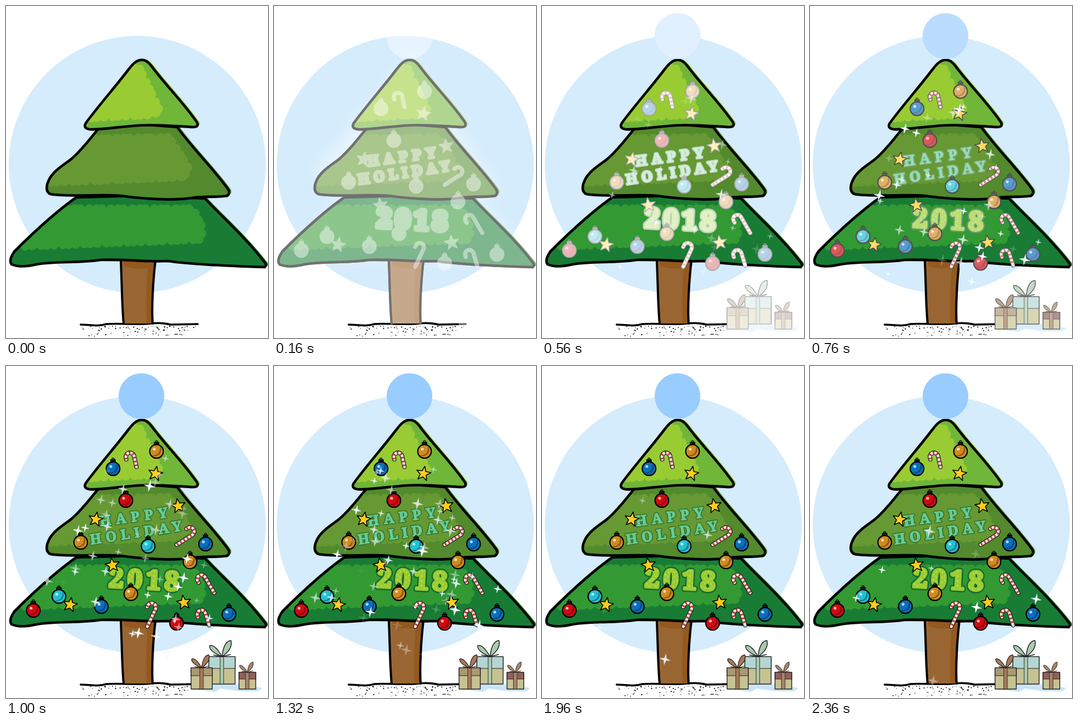
Animation, 470 px wide and 595 px high, one loop 2.4 s. Source, as an HTML page:

```html
<!DOCTYPE html>
<html lang="en">
<head>
<meta charset="utf-8">
<style>
  html, body { margin: 0; width: 100%; height: 100%; overflow: hidden; background: #fff; }
  svg { display: block; width: 470px; height: 595px; }
  text { font-family: "Noto Serif", serif; font-weight: 900; paint-order: stroke; stroke-linejoin: round; }
</style>
</head>
<body>
<svg viewBox="0 0 470 595" fill="none" stroke-linecap="round" stroke-linejoin="round">
  <defs>
    <filter id="whiten"><feColorMatrix values="0 0 0 0 1  0 0 0 0 1  0 0 0 0 1  0 0 0 1 0"/></filter>
    <filter id="soft" x="-20%" y="-20%" width="140%" height="140%"><feGaussianBlur stdDeviation="14"/></filter>
    <pattern id="speckle" width="11" height="9" patternUnits="userSpaceOnUse">
      <path fill="#99cc33" d="M0 0h11v9H0z"/>
      <circle cx="3" cy="3" r="1.6" fill="#cfe04a"/><circle cx="8.5" cy="6.5" r="1.2" fill="#cfe04a"/>
    </pattern>
    <g id="decor"></g>
  </defs>
  <circle cx="235.500" cy="284" r="230.500" fill="#d5ecfc"/>
  <path id="glow" fill="#fff" filter="url(#soft)" d="M242 95L75 295 125 350 20 450H455L365 345 400 325Z"/>
  <g id="ground"></g>
  <g id="tree"></g>
  <use id="treeWhite" href="#tree" filter="url(#whiten)"/>
  <use id="decorColor" href="#decor"/>
  <use id="decorWhite" href="#decor" filter="url(#whiten)"/>
  <g id="sparkles" fill="#fff" stroke="#d5ecfc" stroke-width=".6"></g>
</svg>
<script>
const $ = id => document.getElementById(id);
const clamp = v => Math.max(0, Math.min(1, v));
const path = (d, fill, stroke = 'none', width = 1, extra = '') =>
  `<path d="${d}" fill="${fill}" stroke="${stroke}" stroke-width="${width}" ${extra}/>`;
const at = (x, y, content, turn = 0) =>
  `<g transform="translate(${x} ${y}) rotate(${turn})">${content}</g>`;
const times = (n, make) => Array.from({ length: n }, (_, i) => make(i));

let seed = 7;
const random = (low = 0, high = 1) => low + (high - low) * (seed = seed * 16807 % 2147483647) / 2147483647;

const star = (count, outer, inner) => 'M' + times(count * 2, i => {
  const a = i * Math.PI / count - Math.PI / 2, r = i % 2 ? inner : outer;
  return `${(r * Math.cos(a)).toFixed(1)} ${(r * Math.sin(a)).toFixed(1)}`;
}).join('L') + 'Z';

// Ground line with dots, denser near the line
$('ground').innerHTML =
  path('M134 571C150 571 165 575 180 570 200 568 235 572 260 569Q280 567 295 571L344 570', 'none', '#000', 3.5) +
  times(95, () => {
    const depth = random() ** 1.8, reach = 103 - depth * 10;
    return `<circle cx="${238 + random(-reach, reach)}" cy="${574 + depth * 18}" r="${random(.5, 1.1)}" fill="#000"/>`;
  }).join('');

const tiers = [
  { dark: '#187c34', light: '#339933',
    outline: 'M126 343C95 365 55 400 15 440Q4 456 10 463 25 470 55 463C90 457 130 461 170 455 230 454 250 459 290 457 330 463 400 466 464 468Q469 464 463 458C430 415 390 380 357 345L240 340Z',
    lit: 'M110 364L335 364 353 400 348 418 30 430 60 390Z' },
  { dark: '#528a2d', light: '#669933',
    outline: 'M166 220C150 238 135 260 115 276 95 290 75 303 73 325Q73 338 86 338C130 342 170 337 205 340 250 346 300 350 340 343 360 341 385 343 397 340Q404 334 396 325C370 290 335 255 307 217L240 212Z',
    lit: 'M160 238L292 236 326 288 320 306 75 316 100 280Z' },
  { dark: '#70b639', light: '#99cc33',
    outline: 'M240 97C250 95 256 101 262 109 285 140 320 175 343 209Q346 217 336 217C300 215 270 212 240 214 205 216 170 222 150 221Q138 219 143 210C165 180 200 140 218 116 225 107 231 99 240 97Z',
    lit: 'M200 135L237 108 274 186 266 194 150 200Z' }
];
// Shifted colour slip, shade, light area with a leafy edge, ink line
const tier = ({ dark, light, outline, lit }, i) =>
  path(outline, light, 'none', 0, 'transform="translate(4 -1)"') +
  `<clipPath id="tier${i}"><path d="${outline}"/></clipPath><g clip-path="url(#tier${i})">` +
  path(outline, dark) + path(lit, light, light, 17, 'stroke-dasharray="0 13 0 10 0 16"') + '</g>' +
  path(outline, 'none', '#000', 4.6);

$('tree').innerHTML =
  path('M206 457C208 500 208 540 211 569H263C261 540 264 490 268 457Z', '#996633') +
  path('M212 458H267C263 490 261 540 262 569H252Q250 520 254 470 230 472 212 466Z', '#93591f') +
  path('M206 457C208 500 208 540 211 569M268 457C264 490 261 540 263 569', 'none', '#000', 4) +
  tiers.map(tier).join('');

const baubles = {
  '#d08a1e': [[270, 153], [134, 316], [330, 351], [224, 408]],
  '#0a6fbb': [[192, 184], [358, 319], [171, 431], [400, 445]],
  '#d20a12': [[215, 241], [49, 438], [306, 461]],
  '#22c0d4': [[255, 323], [95, 413]]
};
const bauble = fill =>
  path('M-4 -12V-16H4V-12Z', '#222', '#000', 1.5) +
  '<circle cy="-17" r="2" stroke="#000" stroke-width="1.3"/>' +
  `<circle r="12.2" fill="${fill}" stroke="#000" stroke-width="2.2"/>` +
  path('M6 -10A11.500 11.500 0 0 1 -9 7Q8 8 6 -10Z', '#000', 'none', 0, 'fill-opacity=".35"') +
  '<circle cx="-4" cy="-4" r="2.6" fill="#fff" fill-opacity=".7"/>';

const stars = [[268, 193], [309, 251], [161, 275], [191, 357], [115, 428], [319, 424]];

// x, y, turn, leg length
const canes = [[222, 163, -12, 20], [330, 296, 58, 33], [350, 382, -30, 33], [261, 432, 25, 35], [350, 445, -17, 23]];
const cane = length => {
  const d = `M-7 3V0A7.500 7.500 0 0 1 8 0V${length}`;
  return path(d, 'none', '#222', 7.6) + path(d, 'none', '#eee', 5) +
    path(d, 'none', '#cc3a33', 5, 'stroke-dasharray="3 4" stroke-linecap="butt"');
};

// Box with lid, ribbon and a two-loop bow, sized by its width
const gift = (x, y, w, h, lid, lidHeight, ribbon) => at(x + w / 2, y,
  path(`M${-w / 2} 0h${w}v${h}h${-w}Z`, '#c6c292', '#222', 1.4) +
  path(`M${-w / 2} 0h${w}v${lidHeight}h${-w}Z`, lid, '#222', 1.2) +
  path(`M-3 0h6v${h}h-6Z`, ribbon, '#333') +
  `<g transform="scale(${w / 47})">` +
  path('M0 0Q-24 -10 -22 -20 -12 -22 0 0Q3 -28 16 -29 20 -14 0 0L15 -4M0 0L-15 -3', ribbon, '#222', 1.5) + '</g>');

const label = (text, x, y, turn, size, gap, fill, edge, width) => at(x, y,
  `<text font-size="${size}" letter-spacing="${gap}" fill="${fill}" stroke="${edge}" stroke-width="${width}">${text}</text>`, turn);
const outlined = (text, x, y, turn, size, gap, fill, bold, edge, width) =>
  label(text, x, y, turn, size, gap, edge, edge, width) + label(text, x, y, turn, size, gap, fill, ...bold);

$('decor').innerHTML =
  '<circle cx="243" cy="54" r="41" fill="#99ccff"/>' +
  outlined('HAPPY', 169, 287, -7.5, 25, 8.6, '#66cc99', ['#66cc99', 1.2], '#3f7a2b', 5) +
  outlined('HOLIDAY', 152, 320, -8.7, 25, 7.8, '#66cc99', ['#66cc99', 1.2], '#3f7a2b', 5) +
  outlined('2018', 184, 396, 3, 47, 7, 'url(#speckle)', ['#99cc33', 5], '#176b2e', 10) +
  canes.map(([x, y, turn, length]) => at(x, y, cane(length), turn)).join('') +
  stars.map(([x, y], i) => at(x, y, path(star(5, 13.5, 5.8), '#ffcc1a', '#000', 1.6), i % 2 ? -9 : 11)).join('') +
  Object.entries(baubles).map(([fill, spots]) => spots.map(([x, y]) => at(x, y, bauble(fill))).join('')).join('') +
  path('M336 580L375 570H412L460 577 452 583H420L385 578 375 584Z', '#c9e4f6') +
  gift(364, 521, 47, 49, '#b3d6d4', 21, '#a9c9b0') +
  gift(332, 541, 38, 38, '#a89873', 14, '#a67a58') +
  gift(418, 549, 30, 30, '#936058', 12, '#a8856a');

// Sparkles fall slowly over the tree; a few linger and a few start late
const sparkles = times(78, i => {
  const y = 150 + 320 * random() ** .8, reach = (y - 70) * .56;
  const x = 237 + random(-reach, reach);
  const r = random(5, 10.5);
  const late = i % 15 === 0, slow = i % 15 === 7;
  const birth = late ? 2180 : 400 + 850 * random() ** 1.25;
  const life = slow ? 1500 : random(450, 850);
  const node = document.createElementNS('http://www.w3.org/2000/svg', 'path');
  node.setAttribute('d', star(4, r, r * .28));
  $('sparkles').append(node);
  return { x, y, r, birth, life, node };
});

function draw(now) {
  const t = Math.floor(now % 2400 / 40) * 40;
  const rise = clamp(t / 360);
  const bright = t > 400;
  const flash = bright ? clamp((540 - t) / 140) : rise;
  $('glow').style.opacity = $('treeWhite').style.opacity = flash;
  $('decorWhite').style.opacity = bright ? clamp((930 - t) / 530) : rise;
  $('decorColor').style.opacity = bright ? 1 : 0;
  for (const { x, y, r, birth, life, node } of sparkles) {
    const age = (t - birth) / life;
    const fall = (t - birth) * r * .01;
    node.setAttribute('transform', `translate(${x} ${y + fall}) rotate(11)`);
    node.setAttribute('opacity', clamp(1.1 * Math.min(age / .35, (1 - age) / .65)));
  }
  requestAnimationFrame(draw);
}
draw(0);
</script>
</body>
</html>
```
